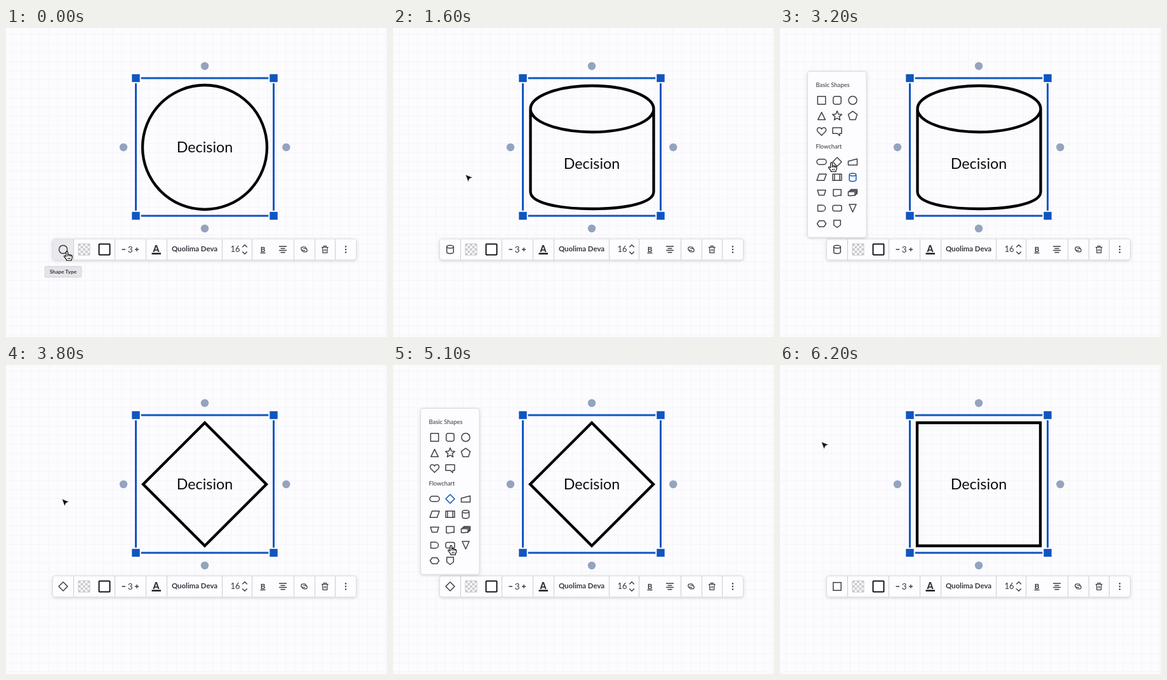
An HTML page that plays this animation: 600 px wide and 487 px high, repeating every 6.3 s.

```html
<!DOCTYPE html>
<html lang="en">
<head>
<meta charset="utf-8">
<title>Shape type picker</title>
<style>
  html, body { margin: 0; width: 100%; height: 100%; overflow: hidden; background: #fcfbfe; }
  svg { display: block; width: 600px; height: 487px; font-family: Lato, "Open Sans", sans-serif; }
  .icon { fill: none; stroke: #3b4048; stroke-width: 1.5; stroke-linejoin: round; }
  .card { fill: #fdfcff; stroke: #dedfe5; stroke-width: 1; filter: drop-shadow(0 1px 2px rgba(40, 45, 60, .2)); }
  .tip rect { fill: #e5e5e9; stroke: #cfd0d5; }
  .tip text { font-weight: 700; font-size: 8.4px; text-anchor: middle; }
  text { fill: #33373f; }
</style>
</head>
<body>
<svg id="stage" viewBox="0 0 600 487"></svg>
<script>
const LOOP = 6300, STEP = 100;
const BLUE = '#0f56bf', INK = '#3b4048';

const box = (w, h, r) =>
  `M${r - w / 2} ${-h / 2}h${w - 2 * r}a${r} ${r} 0 0 1 ${r} ${r}v${h - 2 * r}a${r} ${r} 0 0 1 ${-r} ${r}` +
  `h${2 * r - w}a${r} ${r} 0 0 1 ${-r} ${-r}v${2 * r - h}a${r} ${r} 0 0 1 ${r} ${-r}z`;

// Regular polygon or star, point up
const poly = (n, ...radii) => 'M' + Array.from({ length: n }, (_, i) => {
  const a = i / n * Math.PI * 2, r = radii[i % radii.length];
  return `${(r * Math.sin(a)).toFixed(2)} ${(-r * Math.cos(a)).toFixed(2)}`;
}).join('L') + 'z';

const ICONS = {
  square: 'M-6.2-6.2h12.4v12.4h-12.4z',
  rounded: box(12.4, 12.4, 3),
  circle: box(13, 13, 6.5),
  triangle: 'M0-5.8L5.8 6H-5.8z',
  star: poly(10, 7.8, 3.5),
  pentagon: poly(5, 7.4),
  heart: 'M0 6.5L-6.2 .5C-8.5-2.5-6-6.3-3-5.7Q-1-5.4 0-3.4Q1-5.4 3-5.7C6-6.3 8.5-2.5 6.2 .5z',
  callout: 'M-7-5.5H7V3.5H4V7L.5 3.5H-7z',
  terminator: box(15, 8.4, 4.2),
  diamond: 'M0-7L7 0 0 7-7 0z',
  input: 'M-7-1L7-4.8V5H-7z',
  data: 'M-4-5H7.5L4 5H-7.5z',
  process: 'M-7-5H7V5H-7zM-4.2-5V5M4.2-5V5',
  cylinder: 'M-5.3-4.2a5.3 2.2 0 0 1 10.6 0a5.3 2.2 0 0 1-10.6 0V4.3a5.3 2.2 0 0 0 10.6 0V-4.2',
  manual: 'M-6.5-4H6.5L4 4H-4z',
  document: 'M-6-5H6.2V4.5C3 2.5 0 7.2-6 4.8z',
  documents: 'M-7-1.5H3.5V4.5C1 3-2 6.2-7 4.5zM-5-1.5V-3.3H5.3V3H3.5M-3-3.3V-5H7V1.4H5.3',
  delay: 'M-6-4.7H1.3a4.7 4.7 0 0 1 0 9.4H-6z',
  alternate: box(14, 9, 2.5),
  merge: 'M-5.5-6H5.5L0 6z',
  hexagon: 'M-7 0L-3.7-4.8H3.7L7 0 3.7 4.8H-3.7z',
  offpage: 'M-5.3-5.5H5.3V2L0 6-5.3 2z'
};

const SHAPES = {
  circle: box(196, 196, 98),
  cylinder: 'M-96.5-60.5a97 36.5 0 0 1 194 0a97 36.5 0 0 1-194 0V70C-96.5 87-55 97 .5 97S97.5 87 97.5 70V-60.5',
  diamond: 'M0-97L97 0 0 97-97 0z',
  square: 'M-97-97H97V97H-97z'
};

const icon = (d, x, y, extra = '') => `<path class="icon" d="${d}" transform="translate(${x} ${y})" ${extra}/>`;
const label = (s, x, y, size, extra = '') => `<text x="${x}" y="${y}" font-size="${size}" ${extra}>${s}</text>`;
const tip = (id, s, x, y, w) =>
  `<g class="tip" id="${id}"><rect x="${x - w / 2}" y="${y - 8.5}" width="${w}" height="17" rx="1"/>${label(s, x, y + 3, 8.4)}</g>`;

function grid() {
  let d = '';
  for (let p = 10; p < 600; p += 14.35) d += `M${p} 0V487M0 ${p}H600`;
  return `<path d="${d}" stroke="#f5f4f8" fill="none"/>`;
}

function selection() {
  const corners = [[204.5, 79], [421.5, 79], [204.5, 296], [421.5, 296]];
  const dots = [[313, 60], [441.3, 188], [313, 316], [185, 188]];
  return `<rect x="204.5" y="79" width="217" height="217" fill="none" stroke="${BLUE}" stroke-width="3"/>` +
    corners.map(([x, y]) => `<rect x="${x - 7.2}" y="${y - 7.2}" width="14.4" height="14.4" fill="${BLUE}" stroke="#fcfbfe" stroke-width="2"/>`).join('') +
    dots.map(([x, y]) => `<circle cx="${x}" cy="${y}" r="6.2" fill="#94a4be"/>`).join('');
}

function checker() {
  let s = '<rect x="114" y="340" width="18" height="18" rx="1" fill="#fff" stroke="#c8c8cc"/>';
  for (let i = 0; i < 25; i += 2)
    s += `<rect x="${114 + i % 5 * 3.6}" y="${340 + Math.floor(i / 5) * 3.6}" width="3.6" height="3.6" fill="#c8c8cc"/>`;
  return s;
}

function toolbar() {
  const seps = [106.5, 171.5, 220.5, 253.5, 340.5, 387.5, 453.5, 486.5, 518.5];
  return '<rect class="card" x="73.5" y="332.5" width="478" height="33" rx="3.5"/>' +
    '<path id="hover" d="M106 333H77a3 3 0 0 0-3 3v26a3 3 0 0 0 3 3h29z" fill="#e9e9ed"/>' +
    `<path d="${seps.map(x => `M${x} 333V365`).join('')}" stroke="#c9ccd3"/>` +
    icon('', 90, 349, 'id="current"') + checker() +
    '<rect x="146.5" y="340.5" width="17" height="17" rx="1" fill="#fff" stroke="#15161a" stroke-width="2"/>' +
    '<path d="M182.5 349h5.5M203 349h6M206 346v6" stroke="#33373f" stroke-width="1.3"/>' +
    label('3', 195.6, 353.5, 13.5, 'text-anchor="middle"') +
    label('A', 236.5, 353, 14, 'text-anchor="middle" font-weight="900"') +
    '<path d="M229.5 355.6h14.5" stroke="#111" stroke-width="2.4"/>' +
    label('Quolima Deva', 297, 352.4, 11.4, 'text-anchor="middle" font-weight="700"') +
    label('16', 361, 353.4, 13, 'text-anchor="middle"') +
    icon('M-3.7-3.5L0-7.2 3.7-3.5M-3.7 3.5L0 7.2 3.7 3.5', 376, 349) +
    label('B', 404.5, 352.5, 11.5, 'text-anchor="middle" font-weight="700"') +
    icon('M-4 5.5H4', 404.5, 349, 'stroke-width="1"') +
    icon('M-6-4.8H6M-3.5-1.6H3.5M-6 1.6H6M-3.5 4.8H3.5', 436, 349) +
    icon('M1.5 1.8H-2a2.7 2.7 0 0 1 0-5.4H.5a2.7 2.7 0 0 1 2.5 3.7M-1.5-1.3H2a2.7 2.7 0 0 1 0 5.4H-.5a2.7 2.7 0 0 1-2.5-3.7', 469.5, 348.8, 'style="stroke-width:1.2"') +
    icon('M-5.3-3.4H5.3M-2-3.4V-5.3H2V-3.4M-4-3.4L-3.4 5.4H3.4L4-3.4M-1.3-.8V3M1.3-.8V3', 502.3, 349, 'style="stroke-width:1.2"') +
    [344.5, 349, 353.5].map(y => `<circle cx="535" cy="${y}" r="1.2" fill="${INK}"/>`).join('');
}

function menu() {
  const rows = [114, 138.6, 162.8, 211, 235.3, 259.5, 284, 308.5];
  const names = Object.keys(ICONS);
  let s = '<rect class="card" x="43.5" y="68.5" width="92.5" height="261.5" rx="3.5"/>' +
    label('Basic Shapes', 56.5, 92.6, 9.4) + label('Flowchart', 56.5, 189.6, 9.3);
  names.forEach((name, i) => {
    const slot = i < 8 ? i : i + 1;
    s += icon(ICONS[name], 65.5 + slot % 3 * 24.5, rows[Math.floor(slot / 3)], `data-name="${name}"`);
  });
  return `<g id="menu">${s}</g>`;
}

const stage = document.getElementById('stage');
stage.innerHTML = grid() +
  '<path id="shape" transform="translate(313 188)" fill="none" stroke="#000" stroke-width="4.3"/>' +
  selection() + label('Decision', 313, 195.5, 23.3, 'id="word" text-anchor="middle" style="fill:#0c0d12"') +
  toolbar() + menu() +
  tip('typeTip', 'Shape Type', 90, 384.3, 57.5) +
  tip('dataTip', 'Database', 115, 262, 42) +
  tip('starTip', 'Star', 90, 166.7, 28) +
  `<path id="hand" fill="#fff" stroke="#111" stroke-width="1.2" stroke-linejoin="round"
    d="M-1.4 1Q0-1.2 1.4 1V5.2Q2.8 4.2 3.9 5.6Q5.2 4.8 6.2 6.2Q8.5 5.8 8.4 8.4Q8.4 11 7 12.5V14.5H-.6V13Q-2.6 11-4.6 8.2Q-4.6 6.2-2.8 7L-1.4 8.4zM1.4 5.2V8M3.9 5.8V8M6.2 6.4V8.4M2 10v2.4M4.4 10v2.4"/>` +
  '<path id="arrow" fill="#111" stroke="#fff" stroke-width=".8" d="M0 0L11.5 4.6 6.6 6.6 4.4 11.8z"/>';

const el = id => document.getElementById(id);
const items = [...stage.querySelectorAll('[data-name]')];

// Pointer tip: time, x, y
const PATH = [
  [0, 96, 352], [700, 96, 352], [1100, 114, 230], [1400, 114, 231],
  [1900, 114, 231], [2400, 85, 354], [2700, 85, 354], [3200, 81, 212],
  [3300, 88, 211], [4100, 88, 211], [4600, 95, 319], [4750, 93, 351],
  [4950, 93, 351], [5350, 88, 141], [5500, 72, 138], [5700, 65, 115],
  [5900, 65, 115], [6200, 65, 121]
];
// Menu open and pick times, with the shape picked
const PICKS = [[100, 1500, 'cylinder'], [2700, 3400, 'diamond'], [4900, 5800, 'square']];

const clamp = v => Math.max(0, Math.min(1, v));
const ramp = (t, a, b) => clamp((t - a) / (b - a));
const ease = u => u * u * (3 - 2 * u);
const pulse = (t, a, b, c, d) => ramp(t, a, b) * (1 - ramp(t, c, d));

function pointer(t) {
  const i = PATH.findIndex(k => k[0] > t);
  if (i < 0) return PATH[PATH.length - 1].slice(1);
  const [t0, x0, y0] = PATH[i - 1], [t1, x1, y1] = PATH[i];
  const u = ease(ramp(t, t0, t1));
  return [x0 + (x1 - x0) * u, y0 + (y1 - y0) * u];
}

function draw(t) {
  const [x, y] = pointer(t);
  let kind = 'circle', shown = 0, open = false;
  for (const [from, to, name] of PICKS) {
    if (t >= to) kind = name;
    shown = Math.max(shown, pulse(t, from - 100, from + 100, to - 50, to + 100));
    open = open || (t >= from && t < to);
  }
  el('shape').setAttribute('d', SHAPES[kind]);
  el('current').setAttribute('d', ICONS[kind]);
  el('word').setAttribute('y', kind === 'cylinder' ? 221.5 : 195.5);
  el('menu').setAttribute('opacity', shown);
  for (const item of items) item.style.stroke = item.dataset.name === kind ? BLUE : INK;

  const onButton = y > 332;
  el('hover').setAttribute('opacity', onButton ? 1 : 0);
  const typeTip = 1 - ramp(t, 0, 200) + pulse(t, 2250, 2400, 2600, 2800) + pulse(t, 4700, 4800, 4800, 5000);
  el('typeTip').setAttribute('opacity', typeTip);
  el('dataTip').setAttribute('opacity', pulse(t, 1070, 1200, 1400, 1500));
  el('starTip').setAttribute('opacity', pulse(t, 5300, 5400, 5460, 5600));

  const hand = open || onButton;
  for (const [id, on] of [['hand', hand], ['arrow', !hand]]) {
    el(id).setAttribute('transform', `translate(${x} ${y})`);
    el(id).setAttribute('opacity', on ? 1 : 0);
  }
}

const start = performance.now();
function tick() {
  const t = (performance.now() - start) % LOOP;
  draw(Math.floor(t / STEP) * STEP);
  requestAnimationFrame(tick);
}
tick();
</script>
</body>
</html>
```
